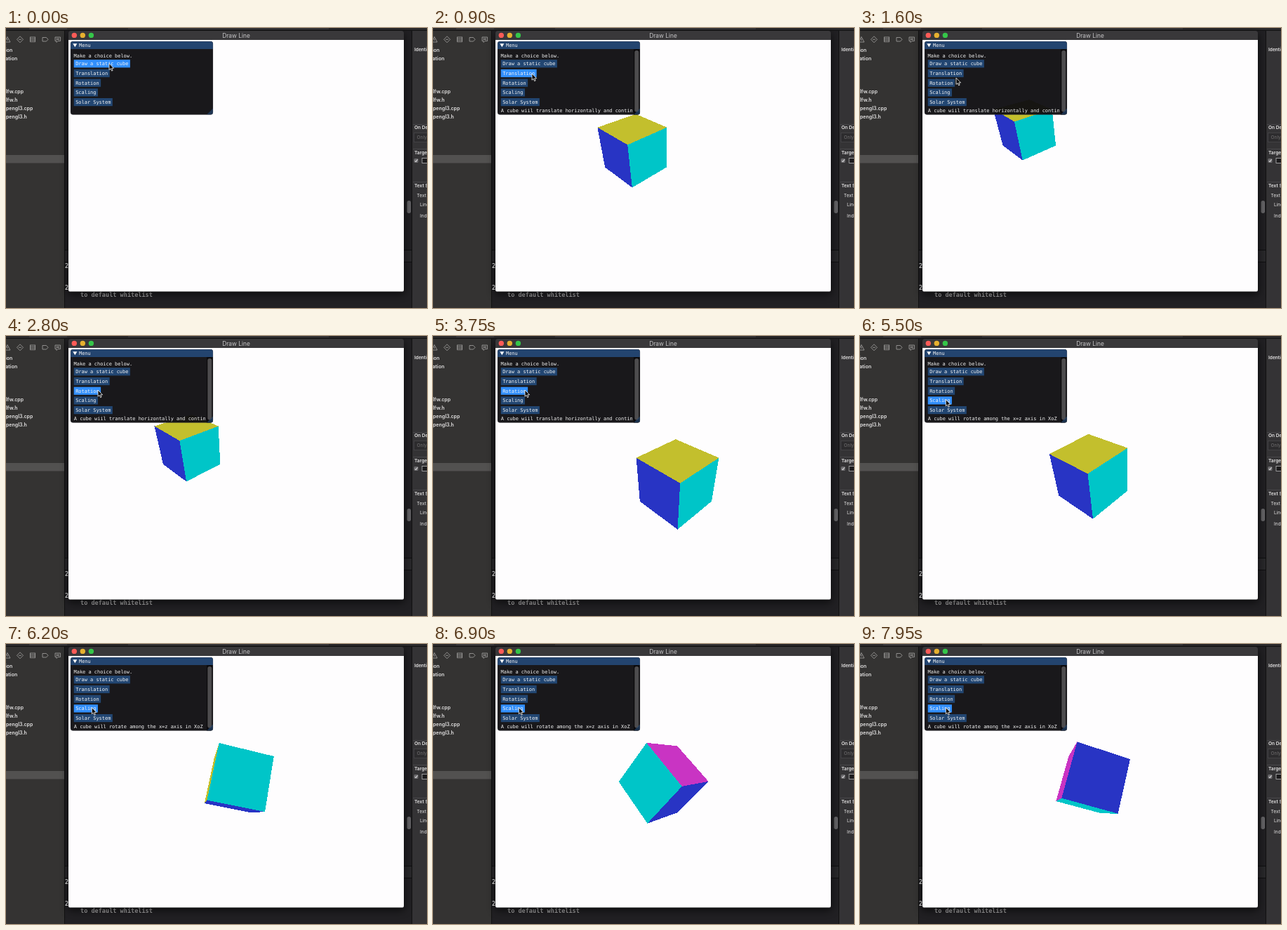
An HTML page that plays this animation: 600 by 399 pixels, repeating every 8 s.

```html
<!DOCTYPE html>
<html lang="en">
<head>
<meta charset="utf-8">
<title>Cube menu</title>
<style>
html, body { margin: 0; width: 100%; height: 100%; overflow: hidden; background: #1c1b1e; }
svg { display: block; width: 600px; height: 399px; }
text { white-space: pre; }
.ui { font: 600 7px Inter, "Open Sans", sans-serif; fill: #e4e3e3; }
.side { font-size: 6.6px; }
.ui .thin { font-weight: 400; }
.ui .dim { font-weight: 400; fill: #6d6c6c; }
.mono { font: 6.94px "DejaVu Sans Mono", monospace; fill: #f4f4f4; }
.log { font: bold 8.55px "DejaVu Sans Mono", monospace; fill: #a9a8a9; }
.icon { fill: none; stroke: #a5a4a3; stroke-width: .8; }
</style>
</head>
<body>
<svg viewBox="0 0 600 399" xmlns="http://www.w3.org/2000/svg">
  <defs>
    <clipPath id="view"><path d="M89 17H567V373Q567 375.5 565 375.5H91Q89 375.5 89 373Z"/></clipPath>
    <clipPath id="panel"><rect x="92" y="19" width="203" height="104.5" rx="3.5"/></clipPath>
    <clipPath id="line"><rect x="92" y="30" width="192.3" height="93"/></clipPath>
    <filter id="soft" x="-10%" y="-10%" width="120%" height="120%"><feGaussianBlur stdDeviation="6"/></filter>
  </defs>

  <!-- editor behind the window -->
  <rect width="600" height="399" fill="#212023"/>
  <rect x="83" y="317" width="496" height="16" fill="#29282b"/>
  <path d="M83 316.5H579M83 333.5H579" stroke="#0f0f10"/>
  <rect width="83" height="399" fill="#343332"/>
  <rect y="181" width="83" height="11.5" fill="#525150"/>
  <rect x="579" width="21" height="399" fill="#343335"/>
  <path d="M83.5 0V399M578.5 0V399" stroke="#111"/>
  <rect width="600" height="3" fill="#2a292b"/>
  <path d="M0 3.5H600" stroke="#121213"/>
  <path d="M33 1H87M174 1H460" stroke="#38373a" stroke-width="2"/>
  <rect x="571.5" y="246" width="5.5" height="18" rx="2.7" fill="#656467"/>
  <g class="log">
    <text x="84" y="342" fill="#e8e8e8">2</text>
    <text x="84" y="373" fill="#e8e8e8">2</text>
    <text x="106" y="382.5">to default whitelist</text>
  </g>
  <g class="icon">
    <path d="M-2 20H6L2 12.5ZM2 15V18"/>
    <path d="M20 11.8L24.5 16.3 20 20.8 15.5 16.3ZM18 16.3H22"/>
    <path d="M34 13H42M34 15.2H42M34 17.4H42M34 19.6H42M34.5 13V19.5M41.5 13V19.5"/>
    <path d="M52 13.5H57.5L60 16.3 57.5 19H52Z"/>
    <path d="M70 13H77.5V18.5H74L72 20.5V18.5H70ZM71.5 15H76M71.5 16.6H76"/>
  </g>
  <g class="ui">
    <text x="-1" y="33.5">ion</text>
    <text x="-7" y="45.5">mation</text>
    <text x="0" y="93.3">lfw.cpp</text>
    <text x="0" y="105.3">lfw.h</text>
    <text x="0" y="117.3">pengl3.cpp</text>
    <text x="0" y="129.3">pengl3.h</text>
  </g>
  <g class="ui side">
    <path d="M580 137.5H600M580 172.5H600M580 219.5H600" stroke="#48474a"/>
    <rect x="581.5" y="149.5" width="22" height="13" fill="#2d2c2e" stroke="#424144"/>
    <text x="582" y="33.3">Identity</text>
    <text x="582" y="144.3">On Demand</text>
    <text class="dim" x="585.5" y="158.3">Only</text>
    <text x="582" y="180.3">Target</text>
    <rect x="581.5" y="186" width="6" height="6" rx="1.2" fill="#6b6a6d"/>
    <path d="M582.8 189.2L584.2 190.7 586.4 187.4" fill="none" stroke="#fff"/>
    <rect x="593" y="185.5" width="9" height="7" fill="#1c1b1d" stroke="#b8b8b8" stroke-width=".8"/>
    <text x="582" y="227.3">Text Settings</text>
    <text class="thin" x="585.5" y="241">Text Encoding</text>
    <text class="thin" x="590" y="254">Line</text>
    <text class="thin" x="590" y="270.3">Indent</text>
  </g>

  <!-- window -->
  <rect x="88" y="8" width="480" height="372" rx="4" fill="#000" opacity=".6" filter="url(#soft)"/>
  <path d="M89 17V7.5Q89 4 92.5 4H563.5Q567 4 567 7.5V17Z" fill="#39383a"/>
  <circle cx="97.3" cy="10.4" r="3.7" fill="#fc5b57"/>
  <circle cx="109.3" cy="10.4" r="3.7" fill="#e6b02f"/>
  <circle cx="121.4" cy="10.4" r="3.7" fill="#35c649"/>
  <text x="328" y="13.7" text-anchor="middle" font-family="Inter, sans-serif" font-size="8.4" fill="#c6c5c7">Draw Line</text>
  <g clip-path="url(#view)">
    <rect x="89" y="16" width="478" height="360" fill="#fefdfe"/>
    <g id="cube" shape-rendering="crispEdges"></g>
  </g>

  <!-- menu -->
  <g clip-path="url(#panel)">
    <rect x="92" y="19" width="203" height="105" fill="#0f0e11" fill-opacity=".955"/>
    <rect x="92" y="19" width="203" height="11" fill="#23446f"/>
    <path d="M95.3 22.2H101.3L98.3 27.2Z" fill="#fff"/>
    <g class="mono">
      <text x="104" y="27">Menu</text>
      <text x="96.6" y="41.6">Make a choice below.</text>
      <g id="buttons"></g>
      <text id="note" x="96.8" y="120.3" clip-path="url(#line)"></text>
    </g>
    <g id="bar">
      <rect x="286" y="30" width="9" height="94" fill="#0b0a0c"/>
      <rect x="287.3" y="32" width="6" height="87.5" rx="2.8" fill="#4d4c4e"/>
    </g>
    <path d="M295 114.5V123.5H286Z" fill="#234a78" fill-opacity=".6"/>
  </g>
  <rect x="92.2" y="19.2" width="202.6" height="104.1" rx="3.5" fill="none" stroke="#45454f" stroke-opacity=".5" stroke-width=".6"/>
  <path id="cursor" d="M0 0V9.2L2.1 7.3 3.6 10.6 5.1 10 3.7 6.8H6.6Z" fill="#050505" stroke="#fff" stroke-width=".8"/>
</svg>
<script>
const LOOP = 8000, STEP = 50;
const $ = id => document.getElementById(id);
const add = (parent, tag, attrs) => {
  const el = document.createElementNS("http://www.w3.org/2000/svg", tag);
  for (const k in attrs) el.setAttribute(k, attrs[k]);
  return parent.appendChild(el);
};

// menu buttons
const buttons = ["Draw a static cube", "Translation", "Rotation", "Scaling", "Solar System"].map((label, i) => {
  const y = 45.2 + i * 13.7, w = label.length * 4.178 + 5;
  const rect = add($("buttons"), "rect", { x: 96.7, y, width: w, height: 11.2 });
  add($("buttons"), "text", { x: 99.2, y: y + 8 }).textContent = label;
  return { rect, y, right: 96.7 + w };
});

// time, x, y of the pointer tip
const path = [
  [0, 147, 50.5], [250, 147, 50.5], [450, 141, 65], [1500, 141, 65], [1600, 137, 71.2],
  [1850, 131, 77], [5400, 131, 77], [5500, 122.3, 90.6], [LOOP, 122.3, 90.6]
];
function pointer(t) {
  const i = path.findIndex(p => p[0] > t);
  const a = path[i - 1], b = path[i], k = (t - a[0]) / (b[0] - a[0]);
  return [a[1] + (b[1] - a[1]) * k, a[2] + (b[2] - a[2]) * k];
}

const modes = [
  { from: 0, note: "" },
  { from: 50, note: "A static cube." },
  { from: 450, note: "A cube wiil translate horizontally and continuously" },
  { from: 5450, note: "A cube will rotate among the x=z axis in XoZ" }
];

// Unit cube seen from (1,1,1); u points to the viewer, w to the right
const H = Math.SQRT1_2, DIST = 4.24, FOCAL = 313;
const CP = Math.sqrt(2 / 3), SP = Math.sqrt(1 / 3);
const corners = { F: [H, 0], R: [0, H], L: [0, -H], B: [-H, 0] };
const faces = [
  ["#c3bf2d", "L+ F+ R+ B+"],
  ["#2834c4", "L+ L- F- F+"],
  ["#00c5c8", "F+ F- R- R+"],
  ["#c934c3", "L- B- R- F-"]
].map(([fill, ids]) => ({ ids: ids.split(" "), el: add($("cube"), "polygon", { fill }) }));

function project(id, shift, angle) {
  const [u0, w0] = corners[id[0]], y0 = id[1] === "+" ? .5 : -.5;
  const c = Math.cos(angle), s = Math.sin(angle);
  const u = u0 + shift * H, w = w0 * c - y0 * s + shift * H, y = w0 * s + y0 * c;
  const k = FOCAL / (DIST - CP * u - SP * y);
  return [328.6 + w * k, 196.1 - (CP * y - SP * u) * k];
}

// back and forth, first to the left
const SPEED = .00201, REACH = 3.147;
function slide(ms) {
  const d = (ms * SPEED + REACH) % (4 * REACH);
  return Math.abs(d - 2 * REACH) - REACH;
}

function draw(t) {
  const mode = modes.findLastIndex(m => t >= m.from), ms = t - modes[mode].from;
  const shift = mode === 2 ? slide(ms) : 0;
  const angle = mode === 3 ? ms / 10 * Math.PI / 180 : 0;
  for (const { ids, el } of faces) {
    const p = ids.map(id => project(id, shift, angle));
    const area = p.reduce((sum, [x, y], i) => {
      const [x2, y2] = p[(i + 1) % 4];
      return sum + x * y2 - x2 * y;
    }, 0);
    el.setAttribute("points", p.join(" "));
    el.style.display = mode && area < 0 ? "" : "none";
  }
  $("note").textContent = modes[mode].note;
  $("bar").style.display = mode ? "" : "none";

  const [x, y] = pointer(t);
  $("cursor").setAttribute("transform", `translate(${x} ${y})`);
  for (const b of buttons) {
    const over = x < b.right && y > b.y && y < b.y + 11.2;
    b.rect.setAttribute("fill", over ? "#328ffb" : "#224672");
  }
}

const start = performance.now();
function tick() {
  const t = Math.max(0, performance.now() - start) % LOOP;
  draw(Math.floor(t / STEP) * STEP);
  requestAnimationFrame(tick);
}
tick();
</script>
</body>
</html>
```
